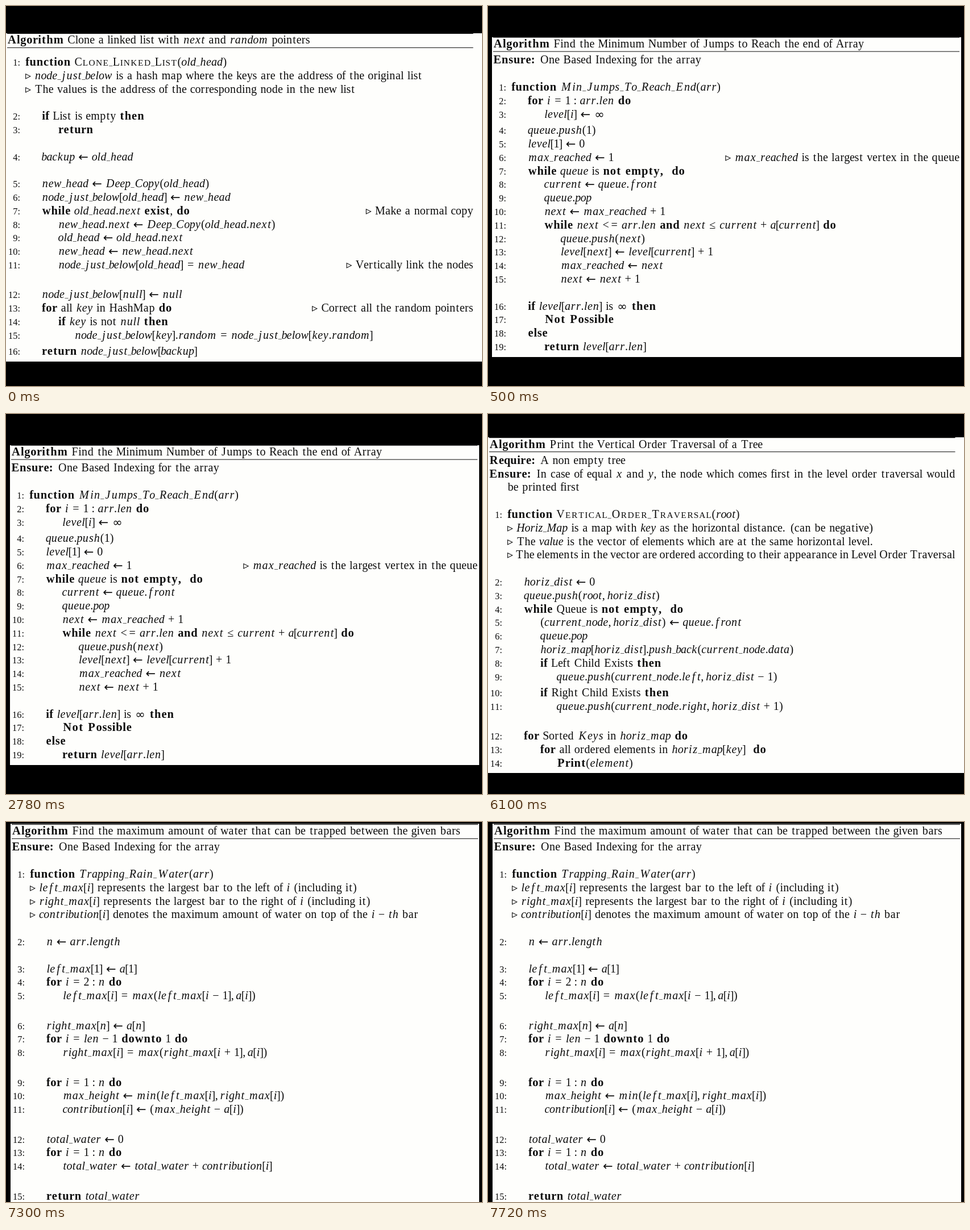
Write an HTML page that moves like this. It is 837 px wide and 669 px high and loops after 8000 ms.

```html
<!DOCTYPE html>
<html lang="en">
<head>
<meta charset="utf-8">
<title>Algorithms</title>
<style>
  html, body { margin: 0; width: 100%; height: 100%; overflow: hidden; background: #000; }
  svg { display: block; width: 100vw; height: 100vh; }
  text {
    font: 20px "Liberation Serif", "DejaVu Sans", serif;
    font-kerning: none;
    font-variant-ligatures: none;
    text-anchor: middle;
    white-space: pre;
    fill: #0c0c0c;
  }
  .paper { fill: #fefefc; }
  .rule { fill: #0c0c0c; }
  .bold { font-weight: bold; font-size: 20.5px; }
  .math, .italic { font-style: italic; }
  .caps { font-size: 15.4px; }
  .label { font-size: 16.4px; }
  .underscore { font-size: 12px; }
  .symbol { font-family: "DejaVu Sans", sans-serif; font-size: 21px; }

  /* Each opaque page covers the ones before it. */
  .page { animation: 8s step-end infinite; }
  .page:nth-child(2) { animation-name: second; }
  .page:nth-child(3) { animation-name: third; }
  .page:nth-child(4) { animation-name: fourth; }
  @keyframes second { 0% { opacity: 0 } 6.25%, 100% { opacity: 1 } }
  @keyframes third { 0% { opacity: 0 } 53.75%, 100% { opacity: 1 } }
  @keyframes fourth { 0% { opacity: 0 } 91.25%, 100% { opacity: 1 } }
</style>
</head>
<body>
<svg id="stage" viewBox="0 0 837 669" preserveAspectRatio="none"></svg>
<script>
const EM = 19.22, LABEL_EM = 16.4, LEADING = 23.8, INDENT = 28.8;

// Typeface advances in thousandths of an em, grouped by width.
const advances = groups => Object.fromEntries(Object.entries(groups)
  .flatMap(([width, chars]) => [...chars].map(ch => [ch, width / 1000])));

const roman = advances({
  278: "ijl.,:[]", 306: "f", 333: " ", 361: "I", 389: "t()", 393: "rs", 444: "cez",
  500: "ago0123456789▹", 514: "J", 528: "kqvxy", 556: "bdhnpuS", 625: "L", 653: "F",
  681: "EP", 708: "B", 722: "wCT", 736: "R", 750: "AHNUVXY", 764: "D", 778: "OQK+−=≤<",
  833: "m", 917: "M", 1000: "←∞", 1028: "W"
});
const faces = {
  roman,
  bold: { ...roman, ...advances({
    319: "il:,", 351: "f", 375: " ", 447: "t", 454: "s", 474: "r", 511: "c", 527: "e",
    559: "a", 575: "go", 607: "vxy", 639: "bdhnpu", 756: "E", 786: "P", 831: "w",
    862: "R", 869: "A", 900: "N", 958: "m"
  }) },
  math: { ...roman, ...advances({
    318: "l", 345: "i", 361: "t", 429: "b", 433: "c", 466: "e", 469: "js", 479: "r",
    482: "q", 485: "o", 503: "p", 509: "z", 513: "g", 521: "dv", 526: "y", 529: "a",
    552: "k", 572: "ux", 576: "h", 597: "f", 600: "n", 651: "J", 723: "T", 743: "w",
    767: "R", 786: "C", 796: "E", 856: "D", 878: "m", 921: "K", 1079: "M", 1083: "W"
  }) },
  italic: { ...roman, ...advances({
    256: "l", 307: "i", 409: "z", 422: "r", 460: "ekv", 486: "y", 511: "aop",
    537: "u", 743: "H", 897: "M"
  }) }
};
const baselineShift = { underscore: -1, symbol: 1 };

// Markup: *bold* $math$ ~italic~ ^small caps^
const marks = { "*": "bold", "$": "math", "~": "italic", "^": "caps" };
const isRelation = ch => "=←≤<:".includes(ch);
const mathPad = ch => isRelation(ch) ? .278 : "+−".includes(ch) ? .222 : 0;
const mathFace = ch => /[a-z]/i.test(ch) ? "math" : "←∞".includes(ch) ? "symbol" : "roman";

function layout(source, stretch = 0) {
  const glyphs = [];
  let mode = "roman", x = 0, spaces = 0;
  const put = (ch, face, width) => {
    glyphs.push({ ch, face, x: (x + width / 2) * EM });
    x += width;
  };
  [...source].forEach((ch, k) => {
    const before = source[k - 1] || " ", after = source[k + 1] || " ";
    if (marks[ch]) {
      mode = mode === marks[ch] ? "roman" : marks[ch];
    } else if (ch === "_") {
      put(ch, "underscore", .36);
    } else if (mode === "math") {
      const pad = mathPad(ch);
      if (!isRelation(before)) x += pad;
      put(ch, mathFace(ch), faces.math[ch]);
      if (!isRelation(after)) x += pad;
      if (ch === ",") x += .167;
    } else if (mode === "caps") {
      const upper = ch.toUpperCase(), small = ch !== upper;
      put(upper, small ? "caps" : "roman", roman[upper] * (small ? .85 : 1.05));
    } else if (ch === " ") {
      const sentenceEnd = before === "." || before === ":";
      put(ch, mode, faces[mode][ch] * (sentenceEnd ? 4 / 3 : 1) + stretch);
      spaces++;
    } else {
      put(ch, mode, faces[mode][ch]);
    }
  });
  return { glyphs, spaces, width: x * EM };
}

function add(parent, tag, attrs = {}) {
  const node = document.createElementNS("http://www.w3.org/2000/svg", tag);
  for (const key in attrs) node.setAttribute(key, attrs[key]);
  return parent.appendChild(node);
}

const box = (parent, name, x, y, right, height) =>
  add(parent, "rect", { class: name, x, y, width: right - x, height });

function drawGlyphs(parent, glyphs, x, y) {
  const text = add(parent, "text");
  for (let k = 0; k < glyphs.length;) {
    const { face } = glyphs[k], run = [];
    while (k < glyphs.length && glyphs[k].face === face) run.push(glyphs[k++]);
    add(text, "tspan", {
      class: face,
      x: run.map(g => (x + g.x).toFixed(2)).join(" "),
      y: y + (baselineShift[face] || 0)
    }).textContent = run.map(g => g.ch).join("");
  }
}

function drawLabel(parent, label, right, y) {
  let x = right;
  const glyphs = [...label].reverse().map(ch => {
    const width = roman[ch] * LABEL_EM;
    x -= width;
    return { ch, face: "label", x: x + width / 2 };
  });
  drawGlyphs(parent, glyphs.reverse(), 0, y);
}

const step = (level, text, note) => ({ level, text, note, numbered: true });
const remark = (text, justify) => ({ level: 0, text: "▹ " + text, justify });
const header = (text, justify) => ({ text, justify });
const blank = { skip: LEADING };
const close = { skip: 4.8 };

function drawPage({ paper: [left, top, right, bottom], margins: [start, end], title, base, lead, rows }) {
  const page = add(stage, "g", { class: "page" });
  box(page, "back", 0, 0, 837, 669);
  box(page, "paper", left, top, right, bottom - top);
  box(page, "rule", start, base - 18.6, end, 1.3);
  box(page, "rule", start, base + 6.6, end, 1);
  drawGlyphs(page, layout("*Algorithm* " + title).glyphs, start, base);

  let y = base + lead, count = 0;
  for (const row of rows) {
    if (row.skip) { y += row.skip; continue; }
    const x = start + (row.level === undefined ? 0 : 32.3 + row.level * INDENT);
    let line = layout(row.text);
    if (row.justify) line = layout(row.text, (end - x - line.width) / line.spaces / EM);
    drawGlyphs(page, line.glyphs, x, y);
    if (row.numbered) drawLabel(page, ++count + ":", start + 23, y);
    if (row.note) {
      const note = layout("▹ " + row.note);
      drawGlyphs(page, note.glyphs, end - note.width, y);
    }
    y += LEADING;
  }
}

const stage = document.getElementById("stage");
const oneBased = header("*Ensure: *One Based Indexing for the array");

[
  {
    paper: [0, 48, 837, 626], margins: [2, 821.5], base: 66.3, lead: 38.7,
    title: "Clone a linked list with $next$ and $random$ pointers",
    rows: [
      step(0, "*function* ^Clone_Linked_List^$(old_head)$"),
      remark("$node_just_below$ is a hash map where the keys are the address of the original list"),
      remark("The values is the address of the corresponding node in the new list"),
      blank,
      step(1, "*if* List is empty *then*"),
      step(2, "*return*"),
      blank,
      step(1, "$backup←old_head$"),
      blank,
      step(1, "$new_head←Deep_Copy(old_head)$"),
      step(1, "$node_just_below[old_head]←new_head$"),
      step(1, "*while* $old_head.next$ *exist*, *do*", "Make a normal copy"),
      step(2, "$new_head.next←Deep_Copy(old_head.next)$"),
      step(2, "$old_head←old_head.next$"),
      step(2, "$new_head←new_head.next$"),
      step(2, "$node_just_below[old_head]=new_head$", "Vertically link the nodes"),
      blank, close,
      step(1, "$node_just_below[null]←null$"),
      step(1, "*for* all $key$ in HashMap *do*", "Correct all the random pointers"),
      step(2, "*if* $key$ is not $null$ *then*"),
      step(3, "$node_just_below[key].random=node_just_below[key.random]$"),
      close,
      step(1, "*return* $node_just_below[backup]$")
    ]
  },
  {
    paper: [7, 55, 832, 618], margins: [9, 829], base: 73, lead: 28.4,
    title: "Find the Minimum Number of Jumps to Reach the end of Array",
    rows: [
      oneBased,
      blank,
      step(0, "*function* $Min_Jumps_To_Reach_End(arr)$"),
      step(1, "*for* $i=1:arr.len$ *do*"),
      step(2, "$level[i]←∞$"),
      close,
      step(1, "$queue.push(1)$"),
      step(1, "$level[1]←0$"),
      step(1, "$max_reached←1$", "$max_reached$ is the largest vertex in the queue"),
      step(1, "*while* $queue$ is *not empty,  do*"),
      step(2, "$current←queue.front$"),
      step(2, "$queue.pop$"),
      step(2, "$next←max_reached+1$"),
      step(2, "*while* $next<=arr.len$ *and* $next≤current+a[current]$ *do*"),
      step(3, "$queue.push(next)$"),
      step(3, "$level[next]←level[current]+1$"),
      step(3, "$max_reached←next$"),
      step(3, "$next←next+1$"),
      blank,
      step(1, "*if* $level[arr.len]$ is $∞$ *then*"),
      step(2, "*Not Possible*"),
      step(1, "*else*"),
      step(2, "*return* $level[arr.len]$")
    ]
  },
  {
    paper: [0, 41, 837, 632], margins: [2, 821.5], base: 59.5, lead: 28.2,
    title: "Print the Vertical Order Traversal of a Tree",
    rows: [
      header("*Require: *A non empty tree"),
      header("*Ensure: *In case of equal $x$ and $y$, the node which comes first in the level order traversal would", true),
      { level: 0, text: "be printed first" },
      blank,
      step(0, "*function* ^Vertical_Order_Traversal^$(root)$"),
      remark("~Horiz_Map~ is a map with ~key~ as the horizontal distance. (can be negative)"),
      remark("The ~value~ is the vector of elements which are at the same horizontal level."),
      remark("The elements in the vector are ordered according to their appearance in Level Order Traversal", true),
      blank,
      step(1, "$horiz_dist←0$"),
      step(1, "$queue.push(root,horiz_dist)$"),
      step(1, "*while* Queue is *not empty,  do*"),
      step(2, "$(current_node,horiz_dist)←queue.front$"),
      step(2, "$queue.pop$"),
      step(2, "$horiz_map[horiz_dist].push_back(current_node.data)$"),
      step(2, "*if* Left Child Exists *then*"),
      step(3, "$queue.push(current_node.left,horiz_dist−1)$"),
      close,
      step(2, "*if* Right Child Exists *then*"),
      step(3, "$queue.push(current_node.right,horiz_dist+1)$"),
      blank, close,
      step(1, "*for* Sorted $Keys$ in $horiz_map$ *do*"),
      step(2, "*for* all ordered elements in $horiz_map[key]$  *do*"),
      step(3, "*Print*$(element)$")
    ]
  },
  {
    paper: [8, 3, 832, 670], margins: [10, 830], base: 22.2, lead: 28.2,
    title: "Find the maximum amount of water that can be trapped between the given bars",
    rows: [
      oneBased,
      blank,
      step(0, "*function* $Trapping_Rain_Water(arr)$"),
      remark("$left_max[i]$ represents the largest bar to the left of $i$ (including it)"),
      remark("$right_max[i]$ represents the largest bar to the right of $i$ (including it)"),
      remark("$contribution[i]$ denotes the maximum amount of water on top of the $i−th$ bar"),
      blank,
      step(1, "$n←arr.length$"),
      blank,
      step(1, "$left_max[1]←a[1]$"),
      step(1, "*for* $i=2:n$ *do*"),
      step(2, "$left_max[i]=max(left_max[i−1],a[i])$"),
      blank, close,
      step(1, "$right_max[n]←a[n]$"),
      step(1, "*for* $i=len−1$ *downto* $1$ *do*"),
      step(2, "$right_max[i]=max(right_max[i+1],a[i])$"),
      blank, close,
      step(1, "*for* $i=1:n$ *do*"),
      step(2, "$max_height←min(left_max[i],right_max[i])$"),
      step(2, "$contribution[i]←(max_height−a[i])$"),
      blank, close,
      step(1, "$total_water←0$"),
      step(1, "*for* $i=1:n$ *do*"),
      step(2, "$total_water←total_water+contribution[i]$"),
      blank, close,
      step(1, "*return* $total_water$")
    ]
  }
].forEach(drawPage);
</script>
</body>
</html>
```
